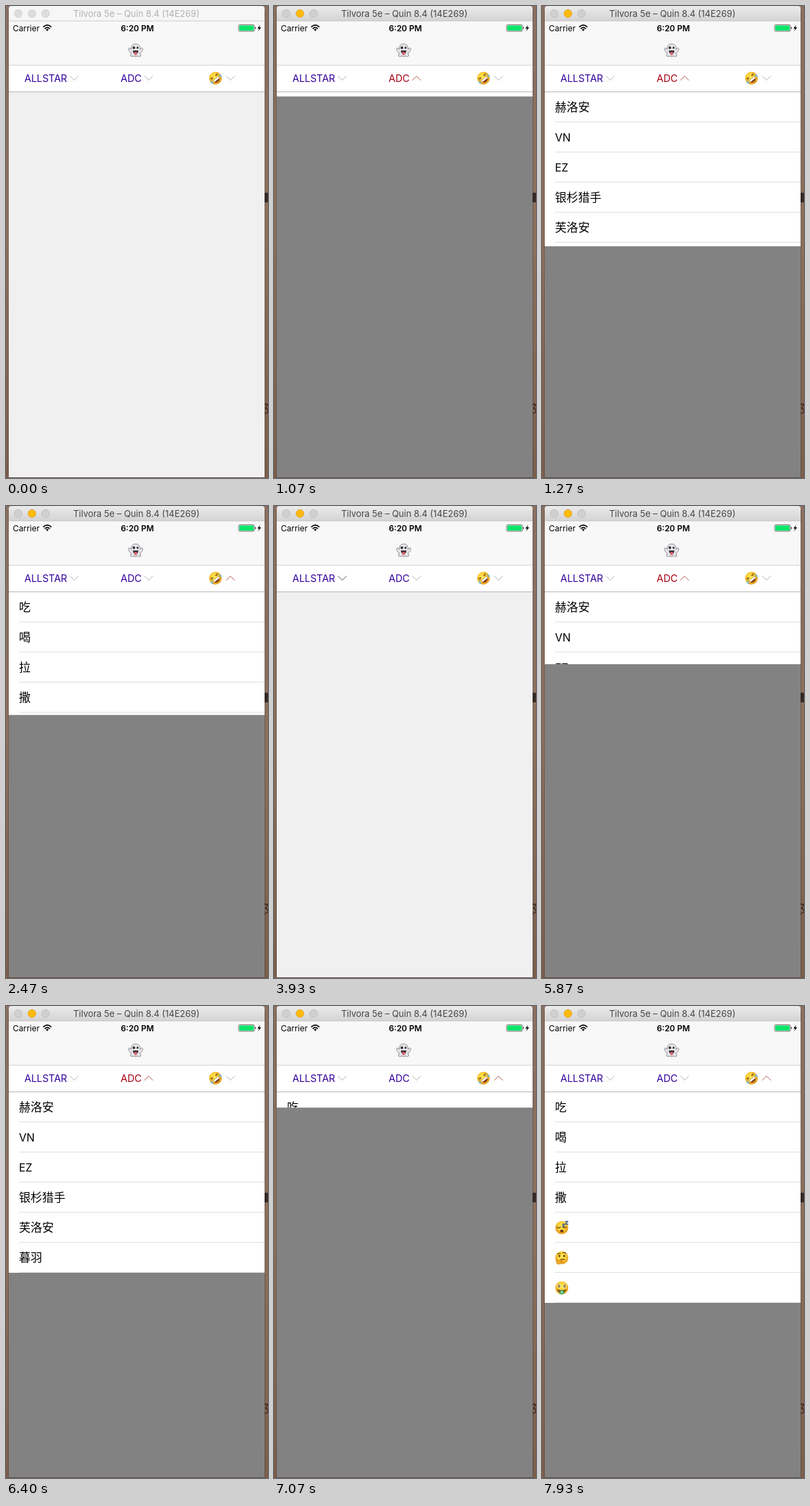
Write an HTML page that moves like this. It is 384 px wide and 690 px high and loops after 8 s.

```html
<!DOCTYPE html>
<html lang="zh">
<head>
<meta charset="utf-8">
<title>Drop-down menu</title>
<style>
  html, body { margin: 0; width: 100%; height: 100%; overflow: hidden; }
  svg { display: block; width: 384px; height: 690px; }
  text { font-family: Inter, "Noto Sans CJK SC", "Noto Sans CJK", sans-serif; }
  .line { fill: none; stroke-linecap: round; stroke-linejoin: round; }
</style>
</head>
<body>
<svg viewBox="0 0 384 690">
  <defs>
    <linearGradient id="desk" x2="0" y2="1">
      <stop offset="0" stop-color="#8b6f60"/><stop offset=".5" stop-color="#8d6f5d"/><stop offset="1" stop-color="#7d5e4d"/>
    </linearGradient>
    <linearGradient id="bar" x2="0" y2="1">
      <stop offset="0" stop-color="#ebebeb"/><stop offset="1" stop-color="#d3d3d3"/>
    </linearGradient>
    <radialGradient id="skin" cy=".4">
      <stop offset="0" stop-color="#ffe95c"/><stop offset=".65" stop-color="#fbd036"/><stop offset="1" stop-color="#e5a01f"/>
    </radialGradient>
    <clipPath id="panelClip"><rect id="clipRect" x="4" y="126" width="375" height="0"/></clipPath>

    <!-- Emoji, centred on 0,0 -->
    <g id="ghost">
      <path d="M0-9.5C-5-9.5-6.5-6-6.5-1.5L-9-4C-11.5-4-10 3-6.5 3.5L-7.5 8Q-5 10-3 8Q0 10.5 3 8Q5 10 7.5 8L6.5 3.5C10 3 11.5-4 9-4L6.5-1.5C6.5-6 5-9.5 0-9.5Z" fill="#e6e6e9" stroke="#8f8f96" stroke-width="1"/>
      <ellipse cx="-2.6" cy="-4" rx="1.9" ry="2.1" fill="#2e2e33"/>
      <ellipse cx="2.8" cy="-4" rx="1.5" ry="1.6" fill="#2e2e33"/>
      <path d="M-4 0H4Q4 5 0 5Q-4 5-4 0Z" fill="#3f3034"/>
      <path d="M-2 2.5H2V6Q0 8-2 6Z" fill="#dd6672"/>
    </g>
    <g id="rofl" transform="rotate(-38)">
      <circle r="9.3" fill="url(#skin)"/>
      <path class="line" d="M-6-4L-2.5-2.8L-6-1.5M6-4L2.5-2.8L6-1.5" stroke="#7a4a18" stroke-width="1"/>
      <path d="M-5.5 .5H5.5Q5 6.5 0 6.5Q-5 6.5-5.5 .5Z" fill="#7d3a1a"/>
      <path d="M-5 .7H5L4.5 3.6H-4.5Z" fill="#fff"/>
      <path d="M-7-1Q-11 2-8.5 4Q-6 4-7-1ZM7-1Q11 2 8.5 4Q6 4 7-1Z" fill="#68bde8"/>
    </g>
    <g id="sleep">
      <circle r="9.5" fill="url(#skin)"/>
      <path class="line" d="M-7-1Q-4.5 2-2-1M1.5-1Q4 2 6.5-1" stroke="#6a3b12" stroke-width="1.2"/>
      <ellipse cy="5" rx="2.5" ry="2" fill="#6b3515"/>
      <path class="line" d="M1-5H4L1-2H4M5-9H9L5-5H9" stroke="#465f85" stroke-width="1.3"/>
    </g>
    <g id="think">
      <circle r="9.5" fill="url(#skin)"/>
      <circle cx="-3.5" cy="-2.5" r="1.4" fill="#5c3211"/><circle cx="3.5" cy="-2.5" r="1.4" fill="#5c3211"/>
      <path class="line" d="M-6-5.5Q-4-7-2-5.5M1.5-7Q4-8.5 6-6.5M-2 3Q1 1.5 4 2.5" stroke="#6a3b12" stroke-width="1.1"/>
      <path d="M-8 3Q-6 2-6 5L1 3.5Q3 4 1 5.5L-2 6.5Q-2 10-6 9.5Q-9 8-8 3Z" fill="#f3ac2b" stroke="#c77f16" stroke-width=".7"/>
    </g>
    <g id="money">
      <circle r="9.5" fill="url(#skin)"/>
      <circle cx="-4" cy="-2.5" r="2.8" fill="#e9dfa5"/><circle cx="4" cy="-2.5" r="2.8" fill="#e9dfa5"/>
      <path class="line" d="M-3-4H-5V-2.5H-3V-1H-5M5-4H3V-2.5H5V-1H3" stroke="#6b5a21" stroke-width=".9"/>
      <path d="M-6.5 2Q0 5 6.5 2Q5 7.5 0 7.5Q-5 7.5-6.5 2Z" fill="#6b3515"/>
      <path d="M-3.5 4H3.5V8Q0 11-3.5 8Z" fill="#3da65d"/>
      <circle cy="6.5" r="1.4" fill="#b5e0b1"/>
    </g>
  </defs>

  <rect width="384" height="690" fill="url(#desk)"/>
  <rect x="379" y="273" width="5" height="14" fill="#352a26"/>
  <path class="line" d="M379 582L384 582.5L380.5 588Q385 589 383.5 594L379 596" stroke="#30231d" stroke-width="1.3"/>
  <path d="M3.5 6V689M379.5 6V689" stroke="#000" stroke-opacity=".18"/>
  <rect x="4" y="22" width="375" height="667" fill="#f0f0f0"/>
  <rect x="4" y="689" width="375" height="1" fill="#5f4a40"/>

  <path id="titleBar" d="M4 22V4Q4 0 8 0H375Q379 0 379 4V22Z"/>
  <g id="lights" stroke-width=".8"></g>
  <text id="title" x="191" y="16" font-size="13" text-anchor="middle">Tilvora 5e – Quin 8.4 (14E269)</text>

  <rect x="4" y="22" width="375" height="64" fill="#f8f8f8"/>
  <rect x="4" y="21.5" width="375" height=".8" fill="#c4c4c4"/>
  <text x="10" y="36.5" font-size="12">Carrier</text>
  <path class="line" d="M55 30.3Q60.5 25.6 66 30.3M57.2 32.8Q60.5 30 63.8 32.8" stroke="#000" stroke-width="1.7"/>
  <path d="M58.4 34.2Q60.5 32.6 62.6 34.2L60.5 36.8Z"/>
  <text x="192.5" y="36.5" font-size="12" font-weight="600" text-anchor="middle">6:20 PM</text>
  <rect x="341" y="27.5" width="23" height="9.5" rx="1.5" fill="#fff" stroke="#333" stroke-width=".7"/>
  <rect x="342" y="28.5" width="21" height="7.5" rx=".8" fill="#0be56b"/>
  <path d="M365 30.5Q367 32.2 365 34Z"/>
  <path d="M372.5 27.5L368.5 33H371L369.5 37L374 31.3H371.3Z"/>
  <use href="#ghost" x="190" y="65"/>

  <rect x="4" y="86" width="375" height="40" fill="#fff"/>
  <rect x="4" y="86" width="375" height="1" fill="#d2d2d2"/>
  <g id="tabs"></g>
  <rect id="dim" x="4" y="126" width="375" height="563" fill="#828282"/>
  <g clip-path="url(#panelClip)">
    <rect x="4" y="126" width="375" height="563" fill="#fff"/>
    <g id="lists"></g>
  </g>
  <rect x="4" y="125" width="375" height="1" fill="#b5b5b5"/>
</svg>

<script>
const LOOP = 8000, STEP = 200 / 3;
const ROW = 44, TOP = 126, COLLAPSE = 200, EXPAND = 300, FADE = 200, PRESS = 110;
const FOCUS_AT = 100;

// A name starting with # refers to an emoji.
const menus = [
  { label: 'ALLSTAR', x: 27, arrow: 100,
    rows: ['棠皇', '小竹客', 'B_Fox', '飞云客', 'UQ', '鲸鱼', '禾澄', '柯澜', '灵鹤'] },
  { label: 'ADC', x: 168, arrow: 209,
    rows: ['赫洛安', 'VN', 'EZ', '银杉猎手', '芙洛安', '暮羽'] },
  { label: '#rofl', x: 307, arrow: 329,
    rows: ['吃', '喝', '拉', '撒', '#sleep', '#think', '#money'] },
];

// Menu -1 means closed.
const taps = [[0, -1], [300, 0], [839, 1], [2100, 2], [3100, -1], [4000, 0], [5537, 1], [6817, 2]]
  .map(([at, menu]) => ({ at, menu }));

const byId = id => document.getElementById(id);
const clamp = v => Math.max(0, Math.min(1, v));
const ease = v => { const p = clamp(v); return p * p * (3 - 2 * p); };

function add(parent, name, attrs, text = '') {
  const node = document.createElementNS('http://www.w3.org/2000/svg', name);
  set(node, attrs);
  node.textContent = text;
  return parent.appendChild(node);
}
function set(node, attrs) {
  for (const key in attrs) node.setAttribute(key, attrs[key]);
}

const lights = [18, 38, 58].map(cx => add(byId('lights'), 'circle', { cx, cy: 11, r: 5.7 }));

for (const menu of menus) {
  const tabs = byId('tabs');
  menu.tab = menu.label[0] === '#'
    ? add(tabs, 'use', { href: menu.label, x: menu.x, y: 105.5 })
    : add(tabs, 'text', { x: menu.x, y: 111, 'font-size': 14.4 }, menu.label);
  menu.chevron = add(tabs, 'path', { class: 'line', 'stroke-width': 1 });
  menu.list = add(byId('lists'), 'g', {});
  menu.rows.forEach((row, i) => {
    const y = TOP + i * ROW;
    if (row[0] === '#') add(menu.list, 'use', { href: row, x: 29, y: y + 22 });
    else add(menu.list, 'text', { x: 19, y: y + 28, 'font-size': /^\w+$/.test(row) ? 16 : 17 }, row);
    add(menu.list, 'rect', { x: 19, y: y + 43, width: 360, height: 1, fill: '#dfdfdf' });
  });
}

const fullHeight = index => index < 0 ? 0 : menus[index].rows.length * ROW;

function draw(time) {
  const now = Math.floor((time + 4) / STEP) * STEP;
  const index = taps.findLastIndex(tap => tap.at <= now);
  const active = taps[index].menu;
  const previous = index ? taps[index - 1].menu : -1;
  const next = taps[index + 1];
  const elapsed = now - taps[index].at;

  const wait = previous < 0 ? 0 : COLLAPSE;
  const collapsing = elapsed < wait;
  const shown = collapsing ? previous : active;
  const height = collapsing
    ? fullHeight(previous) * (1 - ease(elapsed / COLLAPSE))
    : fullHeight(active) * ease((elapsed - wait) / EXPAND);
  const fade = ease(elapsed / FADE);
  const from = previous < 0 ? 0 : 1, to = active < 0 ? 0 : 1;

  set(byId('clipRect'), { height });
  set(byId('dim'), { opacity: from + (to - from) * fade });

  menus.forEach((menu, i) => {
    const open = i === active;
    const pressed = next && next.menu === i && now >= next.at - PRESS;
    const tip = open ? -6 : 6;
    set(menu.list, { visibility: i === shown ? 'visible' : 'hidden' });
    set(menu.tab, { fill: open ? '#a60012' : '#32009c' });
    set(menu.chevron, {
      d: `M${menu.arrow - 6} ${105.5 - tip / 2}l6 ${tip}l6 ${-tip}`,
      stroke: open ? '#b5564b' : pressed ? '#555' : '#b0b0b0',
    });
  });

  const focused = now >= FOCUS_AT;
  set(byId('titleBar'), { fill: focused ? 'url(#bar)' : '#f6f6f6' });
  set(byId('title'), { fill: focused ? '#464646' : '#b2b2b2' });
  lights.forEach((light, i) => {
    const lit = focused && i === 1;
    set(light, {
      fill: lit ? '#fdb90f' : focused ? '#d0d0d0' : '#dcdcdc',
      stroke: lit ? '#dfa023' : focused ? '#bcbcbc' : '#cfcfcf',
    });
  });
}

const start = performance.now();
function tick() {
  draw((performance.now() - start) % LOOP);
  requestAnimationFrame(tick);
}
tick();
</script>
</body>
</html>
```
